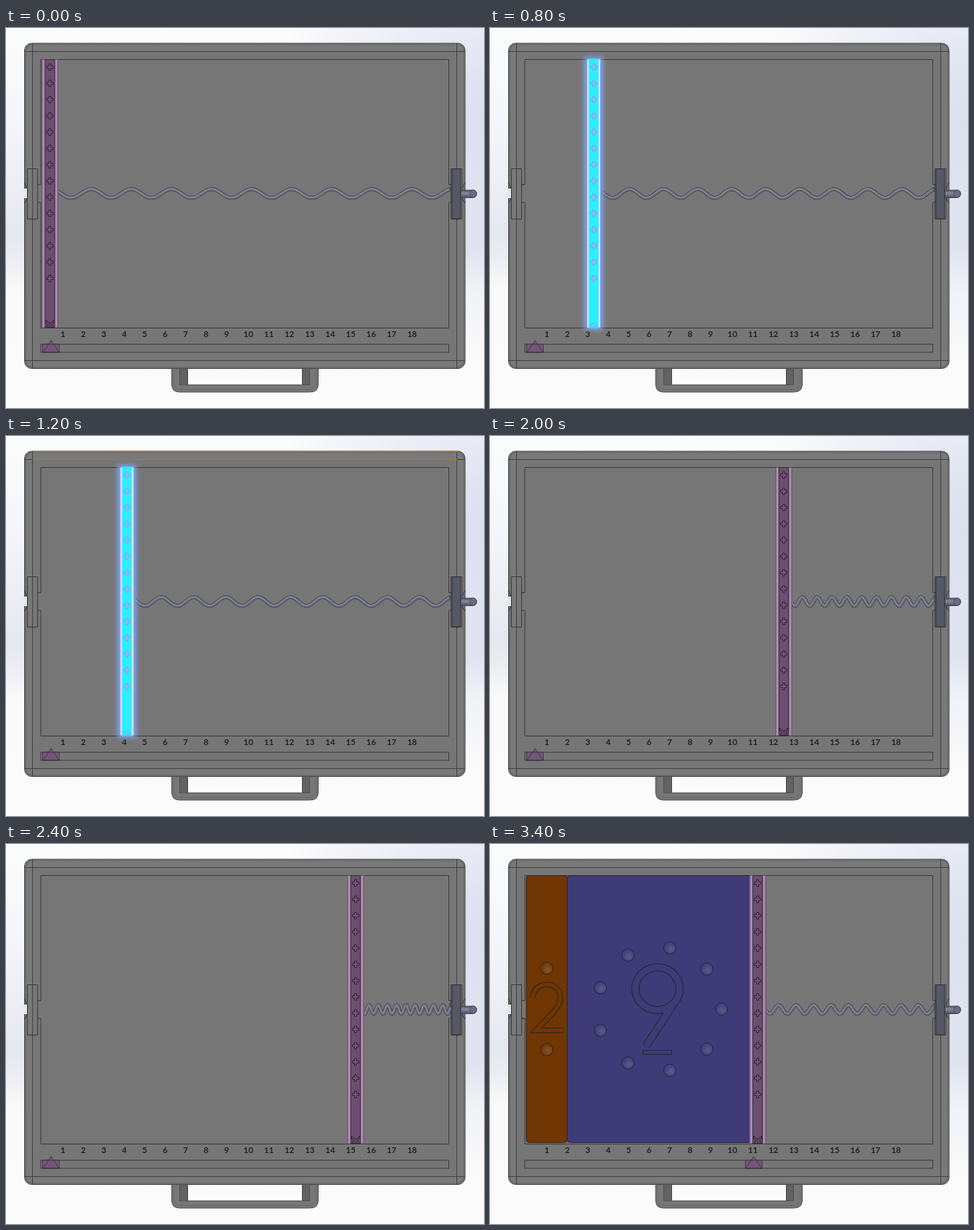
Animation of 659x525 px, one loop 4 s. Source, as an HTML page:

```html
<!DOCTYPE html>
<html lang="en">
<head>
<meta charset="utf-8">
<title>Number case</title>
<style>
  html, body { margin: 0; width: 100%; height: 100%; overflow: hidden; }
  body {
    background:
      radial-gradient(ellipse 290px 330px at 659px 130px, rgba(216,221,238,.9), rgba(222,226,240,0)),
      linear-gradient(#fbfcfd 0, #f5f6f9 25%, #e6e8f0 54%, #eaecf2 60%, #fafafa 69%, #fbfbfb 100%);
  }
  svg { display: block; width: 659px; height: 525px; }
  .line { fill: none; stroke: #343434; }
  .numbers { font: bold 11.5px Lato, "Open Sans", sans-serif; fill: #222; text-anchor: middle; }
  .spring path { fill: none; stroke-linejoin: round; }
</style>
</head>
<body>
<svg viewBox="0 0 659 525">
  <defs>
    <linearGradient id="axle" x2="0" y2="1">
      <stop offset="0" stop-color="#51546a"/>
      <stop offset=".4" stop-color="#85889d"/>
      <stop offset="1" stop-color="#4b4d5e"/>
    </linearGradient>
    <radialGradient id="shine" cx=".6" cy=".6">
      <stop offset="0" stop-color="#fff" stop-opacity=".16"/>
      <stop offset="1" stop-color="#fff" stop-opacity=".02"/>
    </radialGradient>
    <filter id="blur" x="-200%" y="-5%" width="500%" height="110%">
      <feGaussianBlur stdDeviation="3"/>
    </filter>
  </defs>

  <!-- Handle -->
  <path d="M228.5 470V492Q228.5 503 239 503H419Q430.5 503 430.5 492V470H408.5V493H250.5V470Z" fill="#777" stroke="#4a4a4a"/>
  <path d="M239.5 470.5H250.5V493H239.5ZM408.5 470.5H418.5V493H408.5Z" fill="#626262" stroke="#444" stroke-width=".7"/>
  <path class="line" d="M231.5 471V491Q232 499.500 240 499.500H418Q427 499.500 427.500 491V471" stroke-opacity=".2"/>

  <!-- Case -->
  <rect x="25.500" y="21" width="607.500" height="449.500" rx="10" fill="#797979" stroke="#4c4c4c"/>
  <rect x="27" y="22.500" width="604.500" height="446.500" rx="9" fill="none" stroke="#6b6b6b" stroke-width="2"/>
  <path class="line" d="M25.500 32.500H632.500M25.500 459.500H632.500M36.500 21V470M621.500 21V470" stroke-width=".8"/>
  <rect x="37" y="33" width="584" height="426" fill="#767676"/>
  <path id="hot" d="M37 21.500H622M37 32.500H622" stroke="#b9702f" stroke-width="1.3"/>
  <path class="line" d="M43.500 216.500H48V43.500H610.500V216.500H615M43.500 241H48V414.500H610.500V241H615" stroke-width=".9"/>
  <rect x="24" y="222" width="5" height="13" fill="#e5e7ef"/>
  <path class="line" d="M29.500 194.500H43.500V264H29.500ZM25.500 214L29.500 222V235L25.500 242M613.500 194.500H628.500V264H613.500ZM632.500 214L628.500 222M632.500 242L628.500 235" stroke-width=".9"/>
  <rect class="line" x="48" y="437" width="562.500" height="11" stroke-width=".9"/>
  <g class="numbers" id="numbers"></g>

  <g id="pointer">
    <path d="M-11.500 437H11.500V448H-11.500ZM0 431.500L11 448H-11Z" fill="#755579"/>
    <path class="line" d="M-11.500 437H11.500V448H-11.500ZM0 431.500L11 448H-11Z" stroke-width=".8"/>
  </g>

  <g id="blocks" stroke="#25252c" stroke-width=".9">
    <rect x="50" y="43.500" width="56.500" height="369" rx="4" fill="#703603"/>
    <rect x="106.500" y="43.500" width="254" height="369" rx="4" fill="#3e3b78"/>
    <g id="dots"></g>
    <g id="digits"></g>
    <rect x="211" y="285" width="39.500" height="5.500" fill="none"/>
    <path class="line" d="M43.500 216.500H48M43.500 241H48"/>
  </g>

  <g class="spring" id="spring">
    <path stroke="#42444f" stroke-width="5.200"/>
    <path stroke="#6f7180" stroke-width="3.600"/>
    <path stroke="#9698a6" stroke-width="1" transform="translate(-.6 -.6)"/>
  </g>
  <path d="M610.500 220H615V226H612Z" fill="#4a4c58"/>
  <rect x="615" y="194.500" width="11.500" height="69" fill="#565866" stroke="#30313a"/>
  <path d="M627 224H643Q649 224 649 229T643 234.500H627Z" fill="url(#axle)" stroke="#3c3e4a" stroke-width=".8"/>
  <ellipse cx="644" cy="229" rx="4.500" ry="5.200" fill="#696c80" stroke="#3c3e4a" stroke-width=".7"/>

  <g id="bar">
    <g id="plain">
      <rect x="-11" y="43.500" width="22" height="370.500" fill="#977499" stroke="#67506a" stroke-width=".9"/>
      <path d="M-9 44V413.500M9 44V413.500" stroke="#b18db3" stroke-width="2.200"/>
      <rect x="-6.500" y="43.500" width="13" height="370.500" fill="#6c4f70" stroke="#3a2e3d"/>
      <path d="M-5.500 403.500L0 408L5.500 403.500V407L3 410L5.500 413.500H-5.500L-3 410L-5.500 407Z" fill="#5f4463" stroke="#302533" stroke-width=".9"/>
    </g>
    <g id="lit">
      <rect x="-11" y="42" width="22" height="373" fill="#7fa8ff" stroke="#7fa8ff" stroke-width="3" filter="url(#blur)"/>
      <rect x="-9.500" y="43" width="19" height="371" fill="#dfe6ff" stroke="#8b86ee"/>
      <rect x="-6.800" y="42.500" width="13.600" height="372" fill="#2ceffb"/>
      <path d="M-5 410L0 408L4 410V413H-4Z" fill="none" stroke="#8a9eea"/>
    </g>
    <g id="crosses"></g>
  </g>
</svg>
<script>
  const $ = id => document.getElementById(id);
  const show = (id, on) => $(id).style.display = on ? "" : "none";
  const LOOP = 4000, HOME = 62;

  // at: start in ms, x: bar centre
  const poses = [
    { at: 0, x: 60.5 },
    { at: 400, x: 118.5, lit: true },
    { at: 800, x: 143, lit: true },
    { at: 1200, x: 166.7, lit: true, hot: true },
    { at: 1600, x: 329 },
    { at: 2000, x: 405 },
    { at: 2400, x: 482 },
    { at: 2800, x: 482, blocks: true },
    { at: 3400, x: 369, blocks: true, pointer: 363.5 }
  ];

  const range = n => [...Array(n).keys()];

  $("numbers").innerHTML = range(18).map(i =>
    `<text x="${78.4 + i * 28.2 + (i > 8 ? 2 : 0)}" y="426.5">${i + 1}</text>`
  ).join("");

  $("crosses").innerHTML = range(14).map(i =>
    `<path transform="translate(0 ${(54 + i * 22.46).toFixed(1)})"
      d="M-1.500 -4.500H1.500V-1.500H4.500V1.500H1.500V4.500H-1.500V1.500H-4.500V-1.500H-1.500Z"/>`
  ).join("");

  const dot = (x, y) => `<circle cx="${x}" cy="${y}" r="8.5" fill="url(#shine)"/>`;
  $("dots").innerHTML = dot(78.3, 171.5) + dot(78.3, 284) + range(9).map(i => {
    const a = i * Math.PI * 2 / 9;
    return dot(233 + 86 * Math.cos(a), 228 - 86 * Math.sin(a));
  }).join("");

  // A hollow digit: a dark stroke with a narrower one in the block's colour on top
  const hollow = (d, width, colour) => [["#25252c", width + 1], [colour, width - 1]].map(([stroke, w]) =>
    `<path d="${d}" fill="none" stroke="${stroke}" stroke-width="${w}" stroke-miterlimit="8"/>`
  ).join("");
  $("digits").innerHTML =
    hollow("M59 213C59 188 97 188 97 212C97 226 83 237 63.500 257.500H101.500", 6.5, "#703603") +
    hollow("M231 170.500A30.500 29.500 0 1 1 230.900 170.500ZM257 215L215 279.500", 10, "#3e3b78");

  // The coil pitch shrinks evenly as the bar nears the block
  function springPath(bar) {
    const from = bar + 11, end = 614, pitch = (607.7 - bar) / 9.9, steps = 300;
    return "M" + range(steps + 1).map(i => {
      const x = from + (end - from) * i / steps;
      const y = 228.7 - 6 * Math.cos(2 * Math.PI * (end + 1 - x) / pitch);
      return x.toFixed(2) + " " + y.toFixed(2);
    }).join("L");
  }

  function draw(pose) {
    $("bar").setAttribute("transform", `translate(${pose.x} 0)`);
    $("pointer").setAttribute("transform", `translate(${pose.pointer || HOME} 0)`);
    show("plain", !pose.lit);
    show("lit", pose.lit);
    show("hot", pose.hot);
    show("blocks", pose.blocks);
    const crosses = $("crosses");
    crosses.setAttribute("fill", pose.lit ? "#75c9f5" : "#75567a");
    crosses.setAttribute("stroke", pose.lit ? "#8a9eea" : "#302533");
    crosses.setAttribute("stroke-width", pose.lit ? ".8" : "1");
    const d = springPath(pose.x);
    for (const path of $("spring").children) path.setAttribute("d", d);
  }

  let current;
  function tick() {
    const t = performance.now() % LOOP;
    const pose = poses.findLast(p => p.at <= t);
    if (pose !== current) draw(current = pose);
    requestAnimationFrame(tick);
  }
  tick();
</script>
</body>
</html>
```
